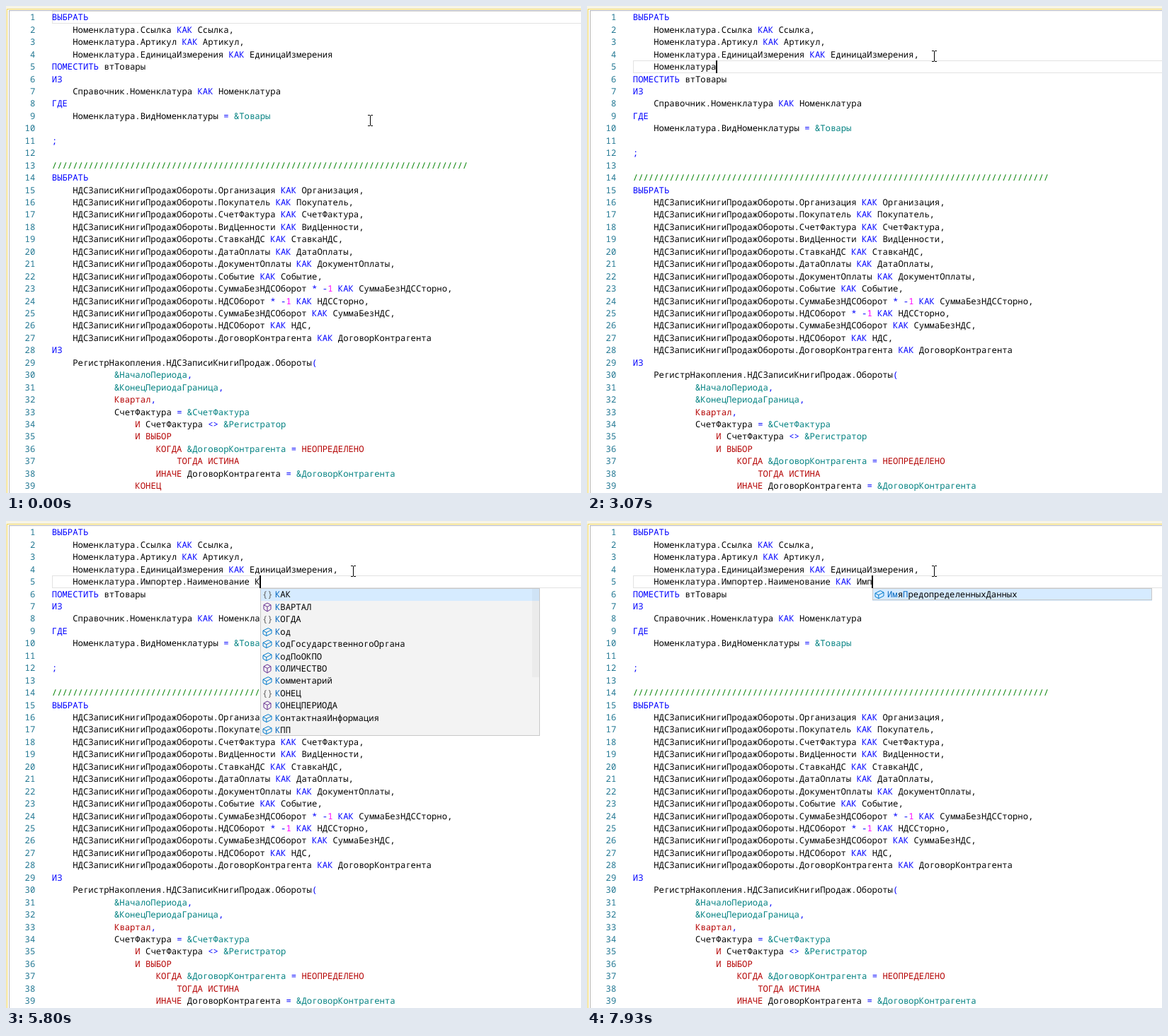
An HTML page with a canvas for the animation above (8000 ms loop, 812 by 689 pixels).

```html
<!DOCTYPE html>
<html lang="ru">
<head>
<meta charset="utf-8">
<title>Редактор запроса</title>
<style>
  html, body { margin: 0; width: 100%; height: 100%; overflow: hidden; background: #fff; }
  canvas { display: block; }
</style>
</head>
<body>
<canvas id="stage" width="812" height="689"></canvas>
<script>
const ctx = document.getElementById('stage').getContext('2d', { alpha: false });
const LOOP = 8000, LEFT = 64.85, CHAR = 7.345, TOP = 7.3, LINE = 17.447;
const POPUP_TOP = 95, POPUP_W = 395;
const BLUE = '#0000ff', RED = '#b40000', TEAL = '#008080', BLACK = '#000';

const field = name => '    НДСЗаписиКнигиПродажОбороты.' + name;
const same = name => field(`${name} КАК ${name},`);
const HEAD = [
  'ВЫБРАТЬ',
  '    Номенклатура.Ссылка КАК Ссылка,',
  '    Номенклатура.Артикул КАК Артикул,',
  '    Номенклатура.ЕдиницаИзмерения КАК ЕдиницаИзмерения'
];
const TAIL = [
  'ПОМЕСТИТЬ втТовары',
  'ИЗ',
  '    Справочник.Номенклатура КАК Номенклатура',
  'ГДЕ',
  '    Номенклатура.ВидНоменклатуры = &Товары',
  '',
  ';',
  '',
  '/'.repeat(80),
  'ВЫБРАТЬ',
  ...['Организация', 'Покупатель', 'СчетФактура', 'ВидЦенности', 'СтавкаНДС',
    'ДатаОплаты', 'ДокументОплаты', 'Событие'].map(same),
  field('СуммаБезНДСОборот * -1 КАК СуммаБезНДССторно,'),
  field('НДСОборот * -1 КАК НДССторно,'),
  field('СуммаБезНДСОборот КАК СуммаБезНДС,'),
  field('НДСОборот КАК НДС,'),
  field('ДоговорКонтрагента КАК ДоговорКонтрагента'),
  'ИЗ',
  '    РегистрНакопления.НДСЗаписиКнигиПродаж.Обороты(',
  '            &НачалоПериода,',
  '            &КонецПериодаГраница,',
  '            Квартал,',
  '            СчетФактура = &СчетФактура',
  '                И СчетФактура <> &Регистратор',
  '                И ВЫБОР',
  '                    КОГДА &ДоговорКонтрагента = НЕОПРЕДЕЛЕНО',
  '                        ТОГДА ИСТИНА',
  '                    ИНАЧЕ ДоговорКонтрагента = &ДоговорКонтрагента',
  '                КОНЕЦ'
];

const COLORS = {};
for (const w of 'ВЫБРАТЬ КАК ПОМЕСТИТЬ ИЗ ГДЕ'.split(' ')) COLORS[w] = BLUE;
for (const w of 'Квартал И ВЫБОР КОГДА ТОГДА ИСТИНА НЕОПРЕДЕЛЕНО ИНАЧЕ КОНЕЦ'.split(' ')) COLORS[w] = RED;

// Prefix "{" marks a keyword, "*" a function, none a field
const LISTS = {
  n: '{НЕ *НАЧАЛОПЕРИОДА {НЕОПРЕДЕЛЕНО Номенклатура ВидНоменклатуры *НЕДЕЛЯ',
  no: 'Номенклатура ВидНоменклатуры {НЕОПРЕДЕЛЕНО *НАЧАЛОПЕРИОДА',
  item: 'Артикул ВерсияДанных ВидНоменклатуры ЕдиницаИзмерения Импортер ИмяПредопределенныхДанных Код Комментарий Наименование НаименованиеПолное ПометкаУдаления Предопределенный',
  itemI: 'Импортер ИмяПредопределенныхДанных ЕдиницаИзмерения',
  firm: 'ВерсияДанных ГоловнойКонтрагент ГруппаДоступа ДополнительнаяИнформация ИмяПредопределенныхДанных ИНН ИсторияНаименований Код КодПоОКПО Комментарий КонтактнаяИнформация КПП',
  firmN: 'Наименование НаименованиеПолное НалоговыйНомер ИсторияНаименований РегистрационныйНомер СвидетельствоСерияНомер',
  firmNa: 'Наименование НаименованиеПолное НалоговыйНомер ИсторияНаименований',
  k: '{КАК *КВАРТАЛ {КОГДА Код КодГосударственногоОргана КодПоОКПО *КОЛИЧЕСТВО Комментарий {КОНЕЦ *КОНЕЦПЕРИОДА КонтактнаяИнформация КПП',
  i: '{И {ИЗ {ИЕРАРХИЯ {ИЛИ {ИМЕЮЩИЕ ИмяПредопределенныхДанных {ИНАЧЕ {ИНДЕКСИРОВАТЬ ИНН {ИСТИНА ИсторияНаименований {ИТОГИ',
  im: '{ИМЕЮЩИЕ ИмяПредопределенныхДанных {ИЗМЕНЕНИЯ ИсторияНаименований КонтактнаяИнформация ДополнительнаяИнформация {ИЗМЕНЕНИЕ',
  imp: 'ИмяПредопределенныхДанных'
};
for (const k in LISTS) LISTS[k] = LISTS[k].split(' ');

const ITEM = 'Номенклатура', FIRM = ITEM + '.Импортер', NAME = FIRM + '.Наименование';
// time, typed text, popup list, scrollbar opacity
const STEPS = [
  [1930, ''],
  [2270, 'Н'], [2330, 'Н', 'n'], [2470, 'Но', 'no'],
  [3070, ITEM],
  [3270, ITEM + '.', 'item', .06], [3330, ITEM + '.', 'item', .4], [3600, ITEM + '.И', 'itemI'],
  [4200, FIRM],
  [4400, FIRM + '.', 'firm', .06], [4470, FIRM + '.', 'firm', .4],
  [4730, FIRM + '.Н', 'firmN'], [4870, FIRM + '.На', 'firmNa'],
  [5200, NAME], [5470, NAME + ' '],
  [5800, NAME + ' К', 'k', .06], [5870, NAME + ' К', 'k', .25], [5930, NAME + ' К', 'k', .4],
  [6400, NAME + ' КАК'], [6870, NAME + ' КАК '],
  [7470, NAME + ' КАК И'], [7530, NAME + ' КАК И', 'i', .4],
  [7670, NAME + ' КАК Им', 'im'], [7870, NAME + ' КАК Имп', 'imp']
];
const CARET_OFF = [[0, 670], [1130, 1470], [3000, 3070], [4130, 4200], [6330, 6400], [7400, 7470]];
const MOUSE = [[40, 514, 162], [140, 508, 122], [250, 492, 72], [330, 480, 47], [470, 468, 66], [660, 468, 66], [930, 490, 71]];

function rect(x, y, w, h, color) {
  ctx.fillStyle = color;
  ctx.fillRect(x, y, w, h);
}
function frame(x, y, w, h, color) {
  ctx.strokeStyle = color;
  ctx.lineWidth = 1;
  ctx.strokeRect(x + .5, y + .5, w - 1, h - 1);
}
function put(text, x, y, color) {
  ctx.fillStyle = color;
  ctx.fillText(text, x, y);
}
function lines(color, x, y, ...paths) {
  ctx.strokeStyle = color;
  ctx.lineWidth = 1;
  ctx.beginPath();
  for (const p of paths)
    for (let i = 0; i < p.length; i += 2) ctx[i ? 'lineTo' : 'moveTo'](x + p[i], y + p[i + 1]);
  ctx.stroke();
}

function drawCode(text, y) {
  let last = BLUE;
  for (const m of text.matchAll(/\/\/.*|&?[А-Яа-яЁё.]+|\d+|\S/g)) {
    const s = m[0];
    let color = BLUE;
    if (s.startsWith('//')) color = '#008000';
    else if (s[0] === '&') color = TEAL;
    else if (/\d/.test(s)) color = '#ff00ff';
    else if (/[А-яЁё]/.test(s)) color = COLORS[s] || BLACK;
    else if (s === ',' && last === BLACK) color = BLACK;
    put(s, LEFT + m.index * CHAR, y, color);
    last = color;
  }
}

function drawIcon(kind, x, y) {
  if (kind === '{') {
    put('{}', x - 7, y + 4, '#606060');
  } else if (kind === '*') {
    lines('#652d90', x, y, [0, -6, 5, -3.3, 5, 2.8, 0, 6, -5, 2.8, -5, -3.3, 0, -6],
      [-5, -3.3, 0, -.6, 5, -3.3], [0, -.6, 0, 6]);
  } else {
    lines('#007acc', x, y, [-6, -1.8, 1.2, -5.4, 6, -3, 6, 2, -1.2, 5.6, -6, 3, -6, -1.8],
      [-6, -1.8, -1.2, .7, 6, -3], [-1.2, .7, -1.2, 5.6]);
  }
}

// Letters of the name that match the typed query
function matches(name, query) {
  const hits = new Set();
  let at = -1;
  for (const c of query) {
    at = at < 0 ? name.indexOf(c) : name.toLowerCase().indexOf(c.toLowerCase(), at + 1);
    if (at < 0) break;
    hits.add(at);
  }
  return hits;
}

function drawPopup(list, query, x, slider) {
  const h = Math.floor(list.length * LINE);
  rect(x, POPUP_TOP, POPUP_W, h, '#f3f3f3');
  rect(x, POPUP_TOP + 1, POPUP_W, Math.round(LINE), '#d6ebff');
  list.forEach((item, i) => {
    const kind = '{*'.includes(item[0]) ? item[0] : '';
    const name = item.slice(kind.length);
    const y = Math.round(108.3 + i * LINE);
    drawIcon(kind, x + 10, y - 4);
    const hits = matches(name, query);
    for (let a = 0, b; a < name.length; a = b) {
      for (b = a + 1; b < name.length && hits.has(b) === hits.has(a);) b++;
      put(name.slice(a, b), x + 21 + a * CHAR, y, hits.has(a) ? '#0066bf' : BLACK);
    }
  });
  if (slider) rect(x + POPUP_W - 11, POPUP_TOP + 1, 10, 125, `rgba(100,100,100,${slider})`);
  frame(x, POPUP_TOP, POPUP_W, h, '#c8c8c8');
}

function drawMouse(t) {
  let i = MOUSE.findIndex(p => p[0] > t);
  if (i < 0) i = MOUSE.length;
  const a = MOUSE[Math.max(i - 1, 0)], b = MOUSE[Math.min(i, MOUSE.length - 1)];
  const k = a === b ? 0 : (t - a[0]) / (b[0] - a[0]);
  const x = Math.round(a[1] + (b[1] - a[1]) * k), y = Math.round(a[2] + (b[2] - a[2]) * k);
  rect(x, y - 7, 1, 14, BLACK);
  for (const s of [-8, 7]) {
    rect(x - 3, y + s, 3, 1, BLACK);
    rect(x + 1, y + s, 3, 1, BLACK);
  }
}

function draw(t) {
  const step = STEPS.filter(s => s[0] <= t).pop();
  const code = [...HEAD, ...TAIL];
  if (t >= 1470) code[3] += ',';
  if (step) code.splice(4, 0, '    ' + step[1]);
  const row = step ? 4 : t >= 670 ? 3 : 0;

  rect(0, 0, 812, 689, '#f6f4e6');
  rect(2, 5, 812, 689, '#fff');
  frame(1, 4, 830, 700, '#f0d45a');
  frame(4, 6, 830, 700, '#b4b4b4');

  const y0 = Math.round(TOP + row * LINE), y1 = Math.round(TOP + (row + 1) * LINE);
  frame(65, y0, 760, y1 - y0, '#e2e2e2');

  ctx.font = `500 ${CHAR / .6}px "Noto Sans Mono", "DejaVu Sans Mono", monospace`;
  ctx.textRendering = 'geometricPrecision';
  code.slice(0, 39).forEach((text, i) => {
    const y = Math.round(20.3 + i * LINE), n = String(i + 1);
    put(n, 41.3 - n.length * CHAR, y, '#237893');
    drawCode(text, y);
  });

  const x = Math.floor(LEFT + code[row].length * CHAR);
  if (step && step[2]) drawPopup(LISTS[step[2]], step[1].match(/[А-яЁё]*$/)[0], x + 1, step[3]);
  if (!CARET_OFF.some(([a, b]) => t >= a && t < b)) rect(x, y0, 2, y1 - y0, BLACK);
  drawMouse(t);
}

function tick() {
  draw(performance.now() % LOOP);
  requestAnimationFrame(tick);
}
tick();
</script>
</body>
</html>
```
